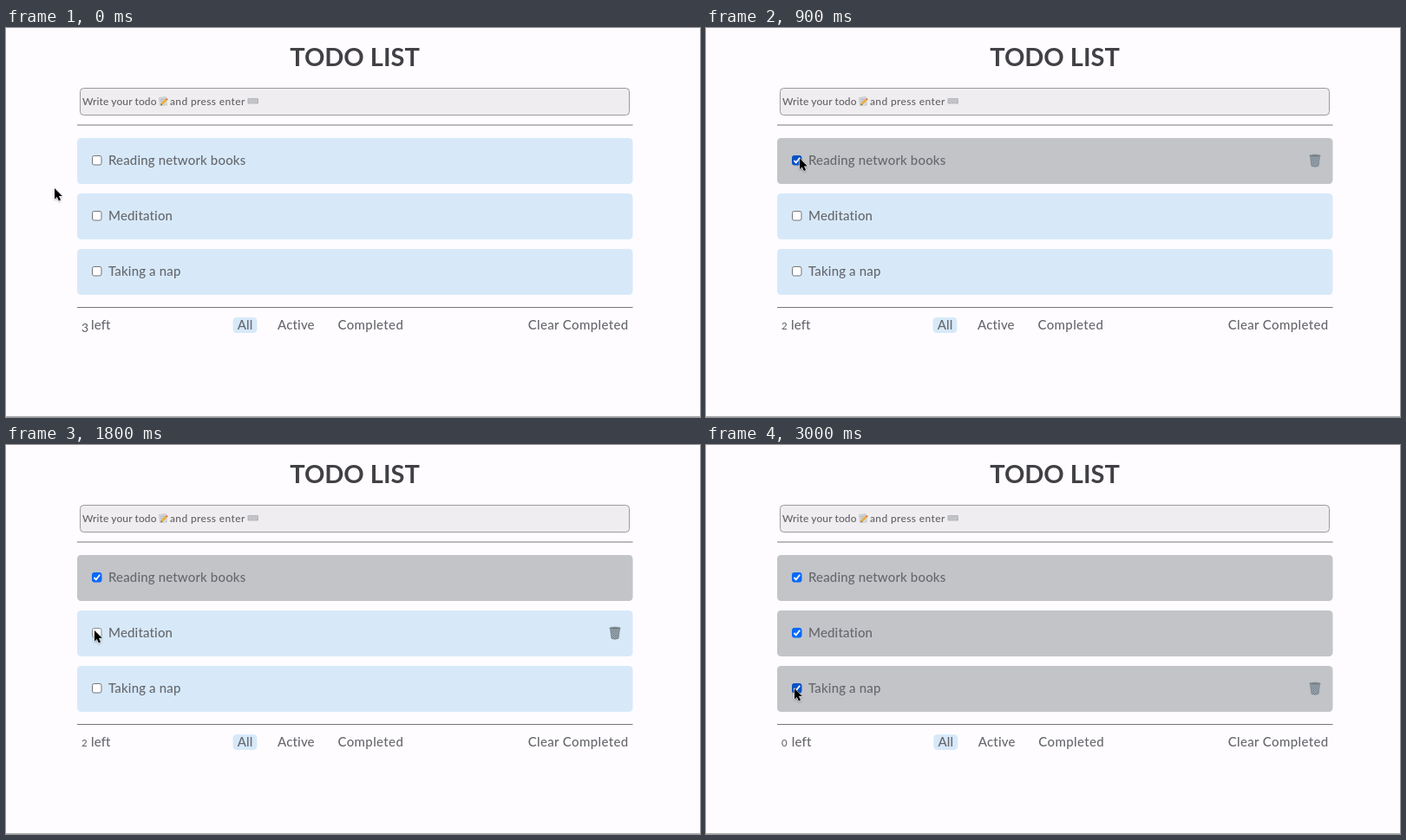
Animation, 800 px wide and 449 px high, one loop 5000 ms. Source, as an HTML page:

```html
<!DOCTYPE html>
<html lang="en">
<head>
<meta charset="utf-8">
<title>Todo list</title>
<style>
  html, body { margin: 0; width: 100%; height: 100%; overflow: hidden; background: #fefcff; }
  svg { display: block; width: 100%; height: 100%; }
  text { font: 500 15px Lato, "Open Sans", sans-serif; letter-spacing: .15px; fill: #66676d; white-space: pre; }
  .title { font-size: 29px; font-weight: 700; letter-spacing: 0; fill: #414045; text-anchor: middle; }
  .hint { font-size: 12px; letter-spacing: .1px; fill: #626166; }
  .loose { letter-spacing: .36px; }
  .end { text-anchor: end; }
  .rule { stroke: #77767a; stroke-width: 1; }
  .card, .pill { fill: #d7e9f9; }
  .done .card { fill: #c2c4c8; }
  .box { fill: #fff; stroke: #747579; stroke-width: 1; }
  .over .box { stroke: #4e5054; }
  .press .box { stroke: #8b8c90; }
  .done .box { fill: #0969fb; stroke: #0969fb; }
  .done.over .box { fill: #0752c5; stroke: #0752c5; }
  .tick { fill: none; stroke: #fff; stroke-width: 1.8; visibility: hidden; }
  .done .tick { visibility: visible; }
  .bin { visibility: hidden; }
  .hot .bin { visibility: visible; }
</style>
</head>
<body>
<svg viewBox="0 0 800 449" preserveAspectRatio="none">
  <defs>
    <pattern id="mesh" width="2.6" height="2.6" patternUnits="userSpaceOnUse">
      <path d="M0 0L2.6 2.6M2.6 0L0 2.6" stroke="#64717b" stroke-width=".65"/>
    </pattern>
    <filter id="shade" x="-50%" y="-50%" width="200%" height="200%">
      <feDropShadow dx="0" dy="1" stdDeviation=".9" flood-opacity=".35"/>
    </filter>
    <g id="trash">
      <path d="M1.4 2.2L3 13.8Q7 15.6 11 13.8L12.6 2.2Z" fill="#a9b4bc"/>
      <path d="M1.4 2.2L3 13.8Q7 15.6 11 13.8L12.6 2.2Z" fill="url(#mesh)" stroke="#77838b" stroke-width=".7"/>
      <ellipse cx="7" cy="2" rx="6.4" ry="1.4" fill="#717c83" stroke="#8f999f" stroke-width=".8"/>
    </g>
  </defs>

  <rect width="800" height="449" fill="#fefcff"/>
  <text class="title" x="402" y="43.5">TODO LIST</text>

  <rect x="85.5" y="69.5" width="633" height="31" rx="4" fill="#efedef" stroke="#9b999d"/>
  <text class="hint" x="88" y="88.5">Write your todo</text>
  <g transform="translate(176 79)">
    <path d="M.5 1.5L8 .5L9.5 10L1.5 10.5Z" fill="#d9dadd" stroke="#aeb0b5" stroke-width=".5"/>
    <path d="M2 3.5L7 3M2.2 5.5L6 5M2.5 7.5L5 7.2" stroke="#9a9ca2" stroke-width=".6"/>
    <path d="M3.5 9L9.3 3.2" stroke="#efad2b" stroke-width="2.4"/>
    <path d="M8.7 3.8L10 2.5" stroke="#d77c78" stroke-width="2.4"/>
    <path d="M2.4 10.2L2.8 8.2L4.3 9.7Z" fill="#554a42"/>
  </g>
  <text class="hint loose" x="189" y="88.5">and press enter</text>
  <rect x="278.5" y="81" width="12.5" height="6.5" rx="1" fill="#b5b6ba"/>
  <path d="M279.5 82.7h10.5M279.5 84.3h10.5M280.5 86h8.5" stroke="#dcdde0" stroke-width=".8" stroke-dasharray="1 .4"/>

  <path class="rule" d="M82 112H722.5M82 322.5H722.5"/>
  <g id="rows"></g>

  <text id="digit" x="87"></text>
  <text id="left" class="end" y="348">left</text>
  <g id="filters">
    <rect class="pill" x="261.5" y="334" width="28" height="18" rx="4.5"/>
    <text x="266.7" y="348">All</text>
    <text x="313" y="348">Active</text>
    <text class="loose" x="382.5" y="348">Completed</text>
  </g>
  <text class="end loose" x="717.5" y="348">Clear Completed</text>
  <path d="M0 448.5H800" stroke="#aaa9ac"/>

  <path id="cursor" d="M0 0V12.4L2.8 9.9L4.9 14.6L7.1 13.6L5 9.1H8.9Z"
        fill="#000" stroke="#fff" stroke-width="1" paint-order="stroke" filter="url(#shade)"/>
</svg>
<script>
  const LOOP = 5000, STEP = 100;
  const $ = id => document.getElementById(id);

  // Press, check and hover times in ms for each item.
  const items = [
    { name: 'Reading network books', press: 700, check: 900, enter: 300, leave: 1200, boxIn: 400, boxOut: 1100 },
    { name: 'Meditation', press: 1700, check: 1900, enter: 1300, leave: 2200, boxIn: 1400, boxOut: 2100 },
    { name: 'Taking a nap', press: 2800, check: 3000, enter: 2200, leave: LOOP, boxIn: 2400, boxOut: LOOP }
  ];

  // Pointer stops: time, x, y.
  const path = [
    [0, 56, 185], [100, 60, 181], [200, 72, 171], [300, 88, 159], [400, 100, 153], [500, 106, 150.5], [600, 108, 150.5],
    [1000, 108, 155], [1100, 106, 172], [1200, 103, 192], [1300, 102, 204], [1400, 102, 211], [1500, 102, 214],
    [2000, 102, 221], [2100, 102, 239], [2200, 102, 260], [2300, 102, 269], [2400, 102, 276], [2500, 102, 280], [2600, 102, 281]
  ];

  $('rows').innerHTML = items.map(({ name }, i) => `
    <g transform="translate(82 ${127 + 64 * i})">
      <rect class="card" width="640.5" height="53" rx="4.5"/>
      <rect class="box" x="17.5" y="20.5" width="10.5" height="10.5" rx="2"/>
      <path class="tick" d="M19.5 26L21.8 28.3L26.2 22.8"/>
      <text x="36" y="31">${name}</text>
      <use class="bin" href="#trash" x="613" y="18.5"/>
    </g>`).join('');
  const rows = [...$('rows').children];

  // Old-style numerals: 0 to 2 stand at x-height, 3 hangs below the line.
  function showCount(count) {
    const hangs = count === 3;
    const shift = [0.8, -0.7, 0, 0][count];
    $('digit').textContent = count;
    $('digit').style.fontSize = hangs ? '14px' : '11.5px';
    $('digit').setAttribute('y', hangs ? 350.5 : 348);
    $('left').setAttribute('x', 120.7 + shift);
    $('filters').setAttribute('transform', `translate(${shift} 0)`);
  }

  function draw(now) {
    const time = Math.floor(now % LOOP / STEP) * STEP;
    const within = (from, to) => time >= from && time < to;
    let count = items.length;
    items.forEach((item, i) => {
      const states = {
        done: time >= item.check,
        hot: within(item.enter, item.leave),
        over: within(item.boxIn, item.boxOut),
        press: within(item.press, item.check)
      };
      if (states.done) count--;
      for (const name in states) rows[i].classList.toggle(name, states[name]);
    });
    showCount(count);
    const [, x, y] = path.findLast(([start]) => start <= time);
    $('cursor').setAttribute('transform', `translate(${x} ${y})`);
  }

  const start = performance.now();
  function tick() {
    draw(performance.now() - start);
    requestAnimationFrame(tick);
  }
  tick();
</script>
</body>
</html>
```
